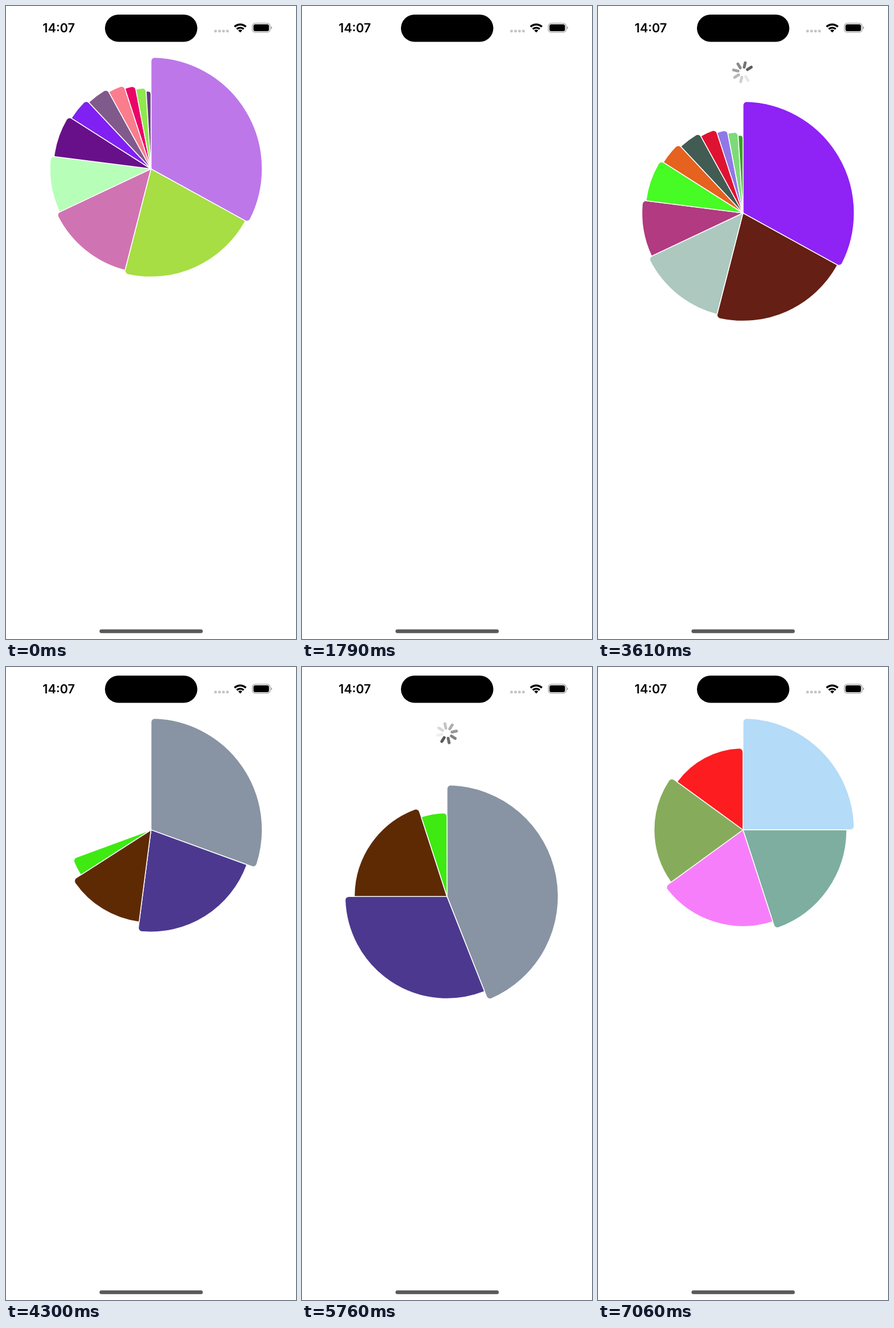
An HTML page that plays this animation: 507x1104 px, repeating every 7090 ms.

```html
<!DOCTYPE html>
<html lang="en">
<head>
<meta charset="utf-8">
<title>Pull to refresh pie</title>
<style>
  html, body { margin: 0; width: 100%; height: 100%; overflow: hidden; background: #fff; }
  svg { display: block; width: 507px; height: 1104px; }
  .clock { font: 600 21.5px Inter, "Liberation Sans", sans-serif; text-anchor: middle; }
</style>
</head>
<body>
<svg viewBox="0 0 507 1104">
  <g id="pie" stroke="#fff" stroke-width="1.5" stroke-linejoin="round"></g>
  <g id="spinner" stroke="#000" stroke-width="5" stroke-linecap="round"></g>

  <text class="clock" x="92.3" y="46">14:07</text>
  <rect x="173" y="15" width="161.5" height="47.5" rx="23.7"/>
  <g fill="#c5c5c7">
    <rect x="364" y="41.5" width="4.6" height="4.5" rx="1.2"/>
    <rect x="371" y="41.5" width="4.6" height="4.5" rx="1.2"/>
    <rect x="377.9" y="41.5" width="4.6" height="4.5" rx="1.2"/>
    <rect x="384.8" y="41.5" width="4.6" height="4.5" rx="1.2"/>
  </g>
  <g fill="none" stroke="#000" stroke-width="3.4">
    <path d="M399.6 36.2A14.2 14.2 0 0 1 419.4 36.2"/>
    <path d="M403.5 40.3A8.6 8.6 0 0 1 415.5 40.3"/>
  </g>
  <path d="M409.5 46.3L406 42.8A5 5 0 0 1 413 42.8Z"/>
  <rect x="430.6" y="30.1" width="31.2" height="15.8" rx="5" fill="none" stroke="#9c9c9e" stroke-width="1.2"/>
  <rect x="432.6" y="32.1" width="27.2" height="11.8" rx="3.2"/>
  <path d="M463.3 35.3Q465.2 36.2 465.2 38T463.3 40.7Z" fill="#9c9c9e"/>
  <rect x="163.5" y="1087.3" width="180.5" height="6.4" rx="3.2" fill="#58595b"/>
</svg>
<script>
const LOOP = 7090, CX = 253.5, CY = 284, RADIUS = 194.5;
const PULL = 180, PEAK = 250, FALL = 320, REST = 77, SWEEP = 340;

const elevenParts = [33, 21, 14, 9, 7, 4, 4, 3, 2, 2, 1];
const pies = [
  { parts: elevenParts, colors: ['#bd77e9', '#a6de44', '#d073b2', '#b7ffb8', '#68108a', '#8020f2',
    '#815a8c', '#f97d8d', '#ea0568', '#8fe84d', '#653681'] },
  { parts: elevenParts, colors: ['#8f22f5', '#651f14', '#adc8be', '#b13a80', '#47fb25', '#e5621f',
    '#425c53', '#df1331', '#9078e8', '#7cdb78', '#38a21f'] },
  { parts: [44, 31, 20, 5], colors: ['#8894a3', '#4c398f', '#5e2a03', '#3eea12'] },
  { parts: [25, 20, 20, 20, 15], colors: ['#b4dbf8', '#7dae9f', '#f77efb', '#86ac5b', '#fd1c20'] }
];

// One entry per refresh: drag start, spinner trigger, release, new pie.
const pulls = [
  { start: 655, trigger: 739, drop: 881, sweep: 1783 },
  { start: 2895, trigger: 3030, drop: 3130, sweep: 4094 },
  { start: 5285, trigger: 5466, drop: 5542, sweep: 6455 }
];

const clamp = x => Math.max(0, Math.min(1, x));
const wave = x => (1 - Math.cos(Math.PI * clamp(x))) / 2;
const inOutQuad = x => x < 0.5 ? 2 * x * x : 1 - 2 * (1 - x) ** 2;

function addPaths(id, count) {
  const group = document.getElementById(id);
  return Array.from({ length: count }, () =>
    group.appendChild(document.createElementNS('http://www.w3.org/2000/svg', 'path')));
}
const slices = addPaths('pie', 11);
const spokes = addPaths('spinner', 8);
const spinner = document.getElementById('spinner');

// Angles run clockwise from twelve o'clock.
const point = (r, a, y = CY) =>
  `${(CX + r * Math.sin(a)).toFixed(2)} ${(y - r * Math.cos(a)).toFixed(2)}`;

function slicePath(r, from, to, first, y) {
  const arc = (to - from) * r;
  const end = Math.min(6.5, arc * 0.6);
  const begin = Math.min(first ? 6.5 : 1.5, arc * 0.3);
  const large = to - from > Math.PI ? 1 : 0;
  return `M${point(0, 0, y)}L${point(r - begin, from, y)}` +
    `A${begin} ${begin} 0 0 1 ${point(r, from + begin / r, y)}` +
    `A${r} ${r} 0 ${large} 1 ${point(r, to - end / r, y)}` +
    `A${end} ${end} 0 0 1 ${point(r - end, to, y)}Z`;
}

function drawPie(pie, grow, offset) {
  const n = pie.parts.length;
  let sum = 0;
  slices.forEach((path, i) => {
    if (i >= n || grow < 0.01) return path.setAttribute('d', '');
    const from = sum;
    sum += pie.parts[i] / 100 * 2 * Math.PI * grow;
    const r = RADIUS * (1 - i / (3 * n));
    path.setAttribute('d', slicePath(r, from, sum, i === 0, CY + offset));
    path.setAttribute('fill', pie.colors[i]);
  });
}

function pullOffset(p, t) {
  if (t < p.drop) return PEAK * Math.sin(Math.PI / 2 * clamp((t - p.start) / PULL));
  const settled = PEAK - (PEAK - REST) * wave((t - p.drop) / FALL);
  return settled * (1 - wave((t - p.sweep + 240) / 220));
}

function drawSpinner(p, t, offset) {
  const gone = p ? clamp((t - p.sweep + 260) / 200) : 1;
  spinner.setAttribute('opacity', 1 - gone);
  if (gone === 1) return;
  const age = t - p.trigger;
  const fade = clamp((age - 60) / 250);
  const turn = Math.max(0, age) * 0.72;
  const y = 115.5 + Math.min(0, offset - REST);
  const shown = clamp((offset - 40) / 130) * 8;
  spinner.setAttribute('transform',
    `translate(${CX} ${y}) rotate(${turn}) scale(${1 - 0.8 * gone}) translate(${-CX} ${-CY})`);
  spokes.forEach((path, i) => {
    const a = i * Math.PI / 4;
    const back = (8 - i) % 8 / 7;
    const lead = 1 - 0.37 * fade;
    const alpha = age < 0 ? clamp(shown - i) : lead + (1 - fade - lead) * back;
    path.setAttribute('d', `M${point(9, a)}L${point(17, a)}`);
    path.setAttribute('opacity', alpha);
  });
}

function draw(t) {
  const done = pulls.filter(p => t >= p.sweep).length;
  const active = pulls.find(p => t >= p.start && t < p.sweep);
  const offset = active ? pullOffset(active, t) : 0;
  const grow = done ? inOutQuad(clamp((t - pulls[done - 1].sweep) / SWEEP)) : 1;
  drawPie(pies[done], grow, offset);
  drawSpinner(active, t, offset);
}

const began = performance.now();
function tick() {
  draw((performance.now() - began) % LOOP);
  requestAnimationFrame(tick);
}
tick();
</script>
</body>
</html>
```
